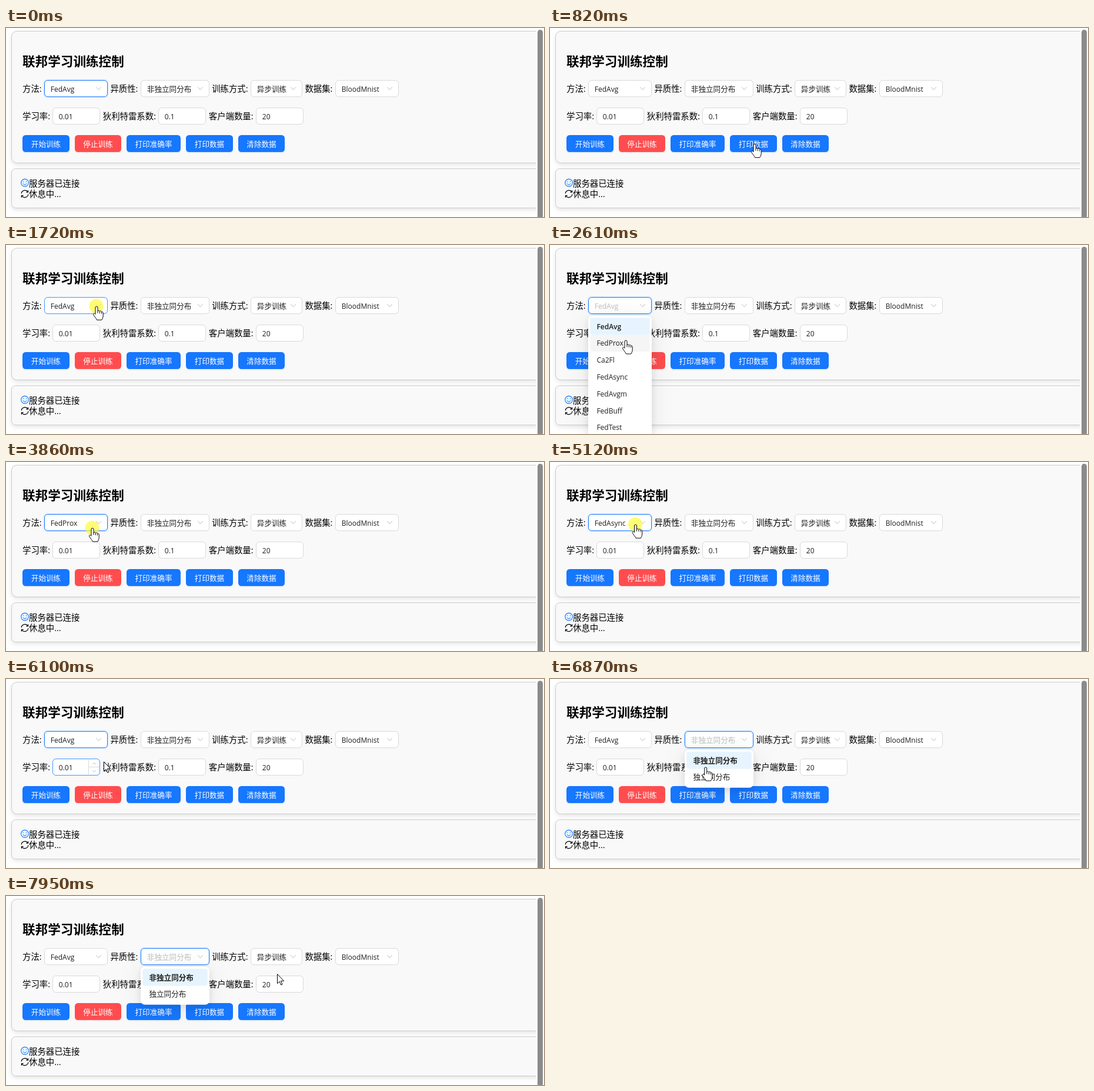
An HTML page for the animation above (8000 ms loop, 915 by 323 pixels).

```html
<!DOCTYPE html>
<html lang="zh">
<head>
<meta charset="utf-8">
<title>联邦学习训练控制</title>
<style>
  html, body { margin: 0; width: 100%; height: 100%; overflow: hidden; background: #fff; }
  svg { display: block; }
  text { font-family: "Open Sans", "Noto Sans CJK SC", "Noto Sans CJK", sans-serif; white-space: pre; }
  .card { fill: #f9f9f9; stroke: #ccc; filter: drop-shadow(0 3px 3.6px rgba(0, 0, 0, .1)); }
  .box { fill: #fff; }
  .ring { fill: none; stroke: rgba(5, 145, 255, .1); stroke-width: 4.6; }
  .line { fill: none; stroke: #bfbfbf; stroke-linecap: round; stroke-linejoin: round; }
  .popup { transform-origin: 0 121px; }
  .sheet {
    fill: #fff;
    filter: drop-shadow(0 4px 7px rgba(0, 0, 0, .1)) drop-shadow(0 6px 20px rgba(0, 0, 0, .08));
  }
  .glyph { fill: #fff; stroke: #000; stroke-linejoin: round; }
</style>
</head>
<body>
<svg id="stage" width="915" height="323" viewBox="0 0 915 323"></svg>
<script>
const LOOP = 8000;
const BLUE = '#1677ff', HOVER = '#4096ff', RED = '#ff4d4f';
const GREY = '#d9d9d9', INK = '#1f1f1f', FADED = '#bfbfbf';
const FIELD = 29, ROW = 28.8, GAP = 4.4, LABEL = 14.4, SMALL = 12.6;
const LIST_TOP = 121, FIRST_ROW = LIST_TOP + 3.6;
const stage = document.getElementById('stage');

const clamp = v => Math.min(1, Math.max(0, v));
const inside = (p, r) => p.x >= r.x && p.x <= r.x + r.w && p.y >= r.y && p.y <= r.y + r.h;
const show = (node, amount) => { node.style.opacity = +amount; };

function add(tag, attrs, parent = stage) {
  const node = document.createElementNS('http://www.w3.org/2000/svg', tag);
  for (const key in attrs) node.setAttribute(key, attrs[key]);
  return parent.appendChild(node);
}

function write(str, x, y, size, fill = '#000', parent = stage) {
  const node = add('text', { x, y, fill, 'font-size': size }, parent);
  node.textContent = str;
  return node;
}

const rect = (x, y, width, height, rx, attrs, parent) =>
  add('rect', { x, y, width, height, rx, ...attrs }, parent);
const path = (d, cls, parent, style = '') => add('path', { d, class: cls, style }, parent);
const sizeOf = str => /[\u4e00-\u9fff]/.test(str) ? SMALL : 12;

// page
const page = add('svg', { width: 901, height: 323 });
rect(9.5, 5.5, 1000, 225, 9, { class: 'card' }, page);
rect(9.5, 240.5, 1000, 67, 7, { class: 'card' }, page);
rect(904, 3, 9, 340, 4.5, { fill: '#8b8b8b' });
write('联邦学习训练控制', 28, 65, 21.6).setAttribute('font-weight', 700);

// a row of labelled fields, laid out from left to right
function fieldRow(y, items) {
  let x = 28;
  return items.map(([label, w, value, isSelect]) => {
    write(label, x, y + 20.3, LABEL);
    x += (label.length - 1) * LABEL + 3.8 + GAP;
    const f = { x: Math.round(x), y, w, h: FIELD, isSelect };
    const shape = cls => rect(f.x + .5, y + .5, w - 1, FIELD - 1, 5.4, { class: cls });
    f.ring = shape('ring');
    f.box = shape('box');
    f.text = write(value, f.x + 10.8, y + 19.7, sizeOf(value), INK);
    if (isSelect) path(`M${f.x + w - 19.5} ${y + 12.2}l4 4.6l4 -4.6`, 'line');
    else f.stepper = addStepper(f);
    x += w + GAP;
    return f;
  });
}

function addStepper({ x, y, w }) {
  const g = add('g'), mid = x + w - 10;
  path(`M${mid - 9.5} ${y + 1}v27m0 -13.5h18.5`, 'line', g, `stroke:${GREY}`);
  path(`M${mid - 2.5} ${y + 9.6}l2.5 -2.6l2.5 2.6m-5 10.8l2.5 2.6l2.5 -2.6`, 'line', g);
  return g;
}

const selects = fieldRow(89, [
  ['方法:', 108, 'FedAvg', true], ['异质性:', 117, '非独立同分布', true],
  ['训练方式:', 88, '异步训练', true], ['数据集:', 108, 'BloodMnist', true]
]);
const inputs = fieldRow(136, [['学习率:', 81, '0.01'], ['狄利特雷系数:', 81, '0.1'], ['客户端数量:', 81, '20']]);
const fields = [...selects, ...inputs];
const [method, spread] = selects;

let buttonX = 28.3;
const buttons = ['开始训练', '停止训练', '打印准确率', '打印数据', '清除数据'].map((label, i) => {
  const width = label.length * SMALL + 29;
  const x = Math.round(buttonX), w = Math.round(buttonX + width) - x, fill = i === 1 ? RED : BLUE;
  rect(x, 184.8, w, FIELD, 5.4, { fill, opacity: .1 });
  rect(x, 183, w, FIELD, 5.4, { fill });
  write(label, x + w / 2, 202.6, SMALL, '#fff').setAttribute('text-anchor', 'middle');
  buttonX += width + 9;
  return { x, y: 183, w, h: FIELD };
});

// status
add('circle', { cx: 32, cy: 264.5, r: 6.4, fill: '#e6f4ff', stroke: BLUE, 'stroke-width': 1.1 });
path('M29.2 266a2.9 2.7 0 0 0 5.6 0M29.4 262.2v.5M34.6 262.2v.5', 'line', stage, `stroke:${BLUE}`);
const arc = 'M26.2 282.5a6 6 0 0 1 11 -2.2m.4 -2.5v2.8h-2.8';
for (const turn of [0, 180]) path(arc, 'line', stage, `stroke:#000;stroke-width:1.2;transform:rotate(${turn}deg);transform-origin:32px 283.5px`);
write('服务器已连接', 39, 270.6, LABEL);
write('休息中...', 39, 288.8, LABEL);

// drop-down lists
function makeList(field, options) {
  const { x, w } = field, h = options.length * ROW + 7.2;
  const group = add('g', { class: 'popup' });
  rect(x, LIST_TOP, w, h, 7.2, { class: 'sheet' }, group);
  const bar = fill => rect(x + 3.4, FIRST_ROW, w - 6.8, ROW, 3.6, { fill }, group);
  const hover = bar('#f5f5f5'), mark = bar('#e6f4ff');
  const texts = options.map((o, i) => write(o, x + 14.4, FIRST_ROW + 19 + ROW * i, sizeOf(o), INK, group));
  return { field, options, group, hover, mark, texts, area: { x, y: field.y, w, h: h + LIST_TOP - field.y } };
}
const lists = [
  makeList(method, ['FedAvg', 'FedProx', 'Ca2Fl', 'FedAsync', 'FedAvgm', 'FedBuff', 'FedTest']),
  makeList(spread, ['非独立同分布', '独立同分布'])
];
const rowAt = p => Math.floor((p.y - FIRST_ROW) / ROW);

// pointer
const pointer = add('g');
const dot = add('circle', { cx: -.5, cy: -.5, r: 12, fill: 'rgba(255,250,40,.65)' }, pointer);
const glyphs = {
  arrow: 'M.5 .5V16.5L4.2 13.2L6.6 19L9 18L6.5 12.2H11.6Z',
  beam: 'M-3 -8h2.4M.6 -8H3M0 -7.5V7.5M-3 8h2.4M.6 8H3',
  hand: 'M-2 2a2 2 0 0 1 4 0v6a1.8 1.8 0 0 1 3.4 .6a1.7 1.7 0 0 1 3.2 .9a1.6 1.6 0 0 1 2.6 1.4' +
    'v5c0 4 -2 6 -2.4 7.2h-8.3c-.8 -2.5 -3.2 -4.5 -5.6 -8.6c-1.3 -2 .8 -3.6 2.4 -2l.7 .8z' +
    'M2 8v3.5M5.4 9v3M8.6 10v2.5'
};
for (const kind in glyphs) glyphs[kind] = path(glyphs[kind], 'glyph', pointer);

// pointer trips; a click comes shortly before the next trip begins
const trip = (leave, arrive, x, y, click) => ({ leave, arrive, x, y, click });
const START = { x: 722, y: 326 };
const trips = [
  trip(330, 1100, 195, 146),
  trip(1170, 1450, 154, 105, true),
  trip(1860, 2470, 129, 163, true),
  trip(2890, 3720, 147, 113, true),
  trip(3990, 4350, 132, 222, true),
  trip(4640, 4910, 145.5, 107, true),
  trip(5260, 5650, 130, 138, true),
  trip(5900, 6100, 166, 141),
  trip(6130, 6380, 306, 105, true),
  trip(6600, 7000, 252, 165),
  trip(7470, 7540, 358, 184),
  trip(7690, 7860, 461, 133)
];
const CLICK_LEAD = 145, REACT = 70, FADE = 200, HOVER_LAG = 80;
const clicks = trips.flatMap((p, i) => p.click ? [{ ...p, t: trips[i + 1].leave - CLICK_LEAD }] : []);

function pointerAt(t) {
  let p = START;
  for (const { leave, arrive, x, y } of trips) {
    if (t < leave) break;
    const k = clamp((t - leave) / (arrive - leave)), e = (1 - Math.cos(Math.PI * k)) / 2;
    p = { x: p.x + (x - p.x) * e, y: p.y + (y - p.y) * e };
  }
  return p;
}

// replays the clicks up to t: each one opens a list or picks a row of the open one
function stateAt(t) {
  const s = { open: null, focus: t < 100 ? method : null };
  s.lists = lists.map(() => ({ since: -LOOP, row: 0 }));
  for (const c of clicks) {
    const at = c.t + REACT;
    if (at > t) break;
    if (s.open) {
      Object.assign(s.lists[lists.indexOf(s.open)], { since: at, row: rowAt(c) });
      s.open = null;
    } else {
      s.open = lists.find(l => inside(c, l.field));
      s.focus = s.open.field;
      s.lists[lists.indexOf(s.open)].since = at;
    }
  }
  return s;
}

function draw(t) {
  const p = pointerAt(t), late = pointerAt(t - HOVER_LAG), s = stateAt(t);

  for (const f of fields) {
    const focused = f === s.focus;
    const hovered = inside(late, f) && !(s.open && inside(late, s.open.area));
    f.box.style.stroke = focused ? BLUE : hovered ? HOVER : GREY;
    show(f.ring, focused);
    if (f.stepper) show(f.stepper, hovered);
  }

  lists.forEach((l, i) => {
    const { since, row } = s.lists[i], isOpen = l === s.open;
    const k = clamp((t - since) / FADE);
    const shown = isOpen ? 1 - (1 - k) ** 4 : 1 - k ** 4;
    show(l.group, shown);
    l.group.style.transform = `scaleY(${.8 + .2 * shown})`;
    l.mark.style.transform = `translateY(${row * ROW}px)`;
    l.hover.style.transform = `translateY(${rowAt(p) * ROW}px)`;
    show(l.hover, inside(p, l.area) && rowAt(p) >= 0);
    l.texts.forEach((node, j) => { node.style.fontWeight = j === row ? 600 : 400; });
    l.field.text.textContent = l.options[row];
    l.field.text.style.fill = isOpen ? FADED : INK;
  });

  const under = fields.find(f => inside(p, f));
  const overList = s.open && inside(p, s.open.area);
  const pressable = overList || (under && under.isSelect) || buttons.some(b => inside(p, b));
  const kind = pressable ? 'hand' : under ? 'beam' : 'arrow';
  for (const name in glyphs) show(glyphs[name], name === kind);
  show(dot, clicks.some(c => t >= c.t && t < c.t + 180));
  pointer.style.transform = `translate(${p.x}px,${p.y}px)`;
}

const begin = performance.now();
function tick() {
  draw((performance.now() - begin) % LOOP);
  requestAnimationFrame(tick);
}
tick();
</script>
</body>
</html>
```
